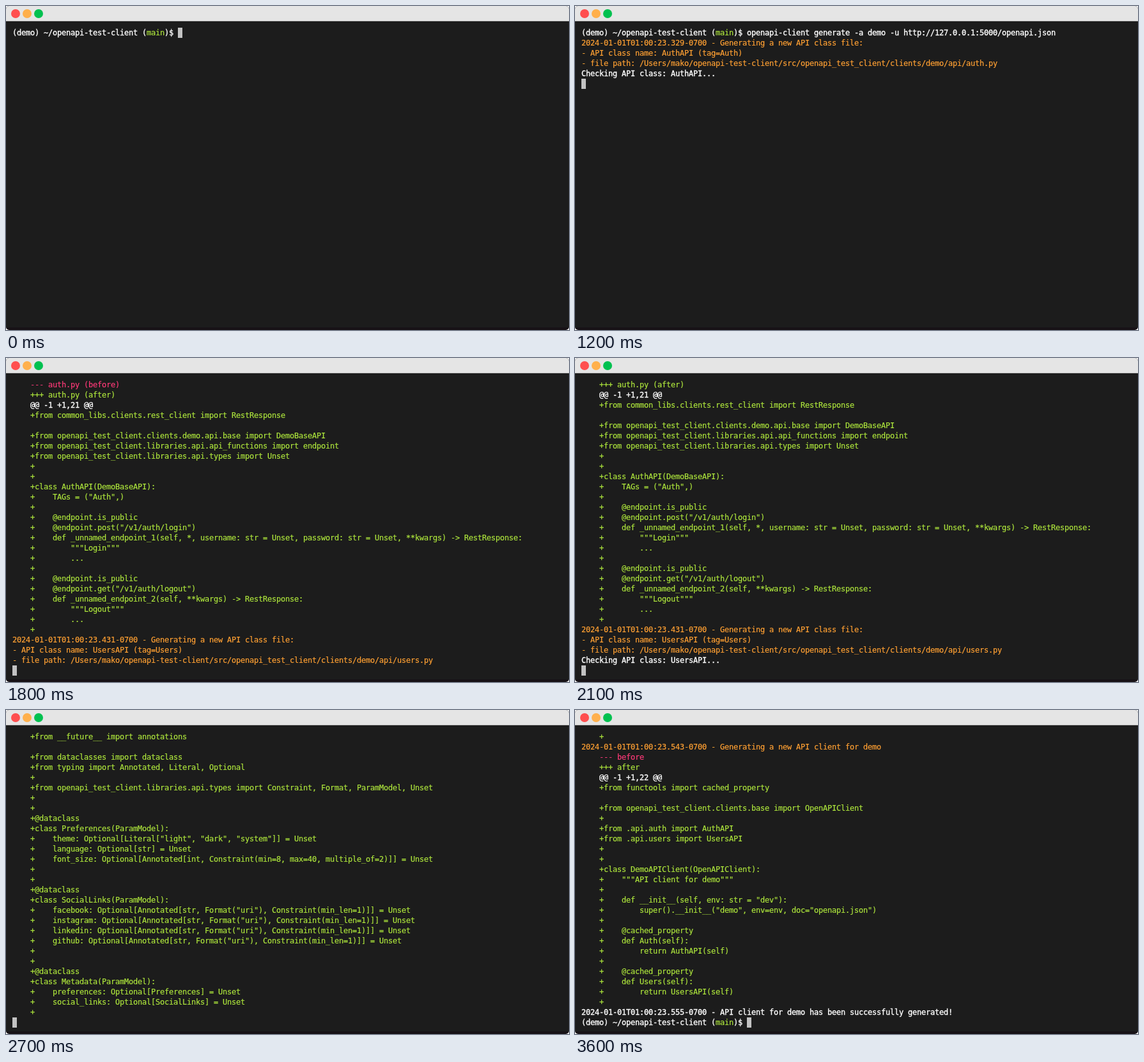
Recreate the animation shown at these times as an HTML page. Size 881 by 508 pixels, loop 4.5 s.

```html
<!DOCTYPE html>
<html lang="en">
<head>
<meta charset="utf-8">
<title>API client generator</title>
<style>
  html, body { margin: 0; width: 881px; height: 508px; overflow: hidden; background: #fff; }
  #win { position: absolute; inset: 0; overflow: hidden; border-radius: 5px; background: #171216; }
  #bar { position: absolute; left: 0; top: 0; width: 100%; height: 23px; background: #e5e5e5; border-bottom: 1px solid #bdbdbd; }
  #bar i { position: absolute; top: 5px; width: 14px; height: 14px; border-radius: 50%; }
  #body { position: absolute; left: 0; top: 24px; width: 100%; height: 480px; background: #1c1c1c; }
  #term {
    position: absolute; left: 10px; top: 34px; margin: 0; color: #fff;
    font: 12px/16px "DejaVu Sans Mono", monospace;
    -webkit-text-stroke: 0.2px currentColor;
  }
  #term div { height: 16px; white-space: pre; }
  #cursor { position: absolute; width: 7px; height: 16px; background: #c2c2c2; }
  .white { color: #fff; -webkit-text-stroke-width: 0.35px; }
  .green { color: #ade53c; }
  .orange { color: #ffa033; }
  .red { color: #fc3a78; }
</style>
</head>
<body>
<div id="win">
  <div id="body"></div>
  <div id="bar">
    <i style="left:8px;background:#ff4f4f"></i>
    <i style="left:26px;background:#ffb04c"></i>
    <i style="left:44px;background:#00c150"></i>
  </div>
  <div id="term"></div>
  <div id="cursor"></div>
</div>
<script>
const COLS = 123, ROWS = 29, CELL = 7, LINE = 16, STEP = 300, LOOP = 4500;
const PROMPT = '(demo) ~/openapi-test-client (main)$ ';
const term = document.getElementById('term');
const cursor = document.getElementById('cursor');

const stamp = ms => `2024-01-01T01:00:23.${ms}-0700 - `;
const announce = (ms, tag) => `${stamp(ms)}Generating a new API class file:
- API class name: ${tag}API (tag=${tag})
- file path: /Users/mako/openapi-test-client/src/openapi_test_client/clients/demo/api/${tag.toLowerCase()}.py
`;
const checking = tag => `Checking API class: ${tag}API...\n`;
const diff = text => text.trim().split('\n').map(s => '    ' + s + '\n').join('');

const authDiff = diff(`
--- auth.py (before)
+++ auth.py (after)
@@ -1 +1,21 @@
+from common_libs.clients.rest_client import RestResponse

+from openapi_test_client.clients.demo.api.base import DemoBaseAPI
+from openapi_test_client.libraries.api.api_functions import endpoint
+from openapi_test_client.libraries.api.types import Unset
+
+
+class AuthAPI(DemoBaseAPI):
+    TAGs = ("Auth",)
+
+    @endpoint.is_public
+    @endpoint.post("/v1/auth/login")
+    def _unnamed_endpoint_1(self, *, username: str = Unset, password: str = Unset, **kwargs) -> RestResponse:
+        """Login"""
+        ...
+
+    @endpoint.is_public
+    @endpoint.get("/v1/auth/logout")
+    def _unnamed_endpoint_2(self, **kwargs) -> RestResponse:
+        """Logout"""
+        ...
+
`);

const usersDiff = diff(`
+    def _unnamed_endpoint_2(
+        self,
+        *,
+        id: Optional[int] = Unset,
+        email: Optional[Annotated[str, Format("email")]] = Unset,
+        role: Optional[Literal["admin", "viewer", "support"]] = Unset,
+        **kwargs,
+    ) -> RestResponse:
+        """Get users"""
+        ...
+
+    @endpoint.get("/v1/users/{user_id}")
+    def _unnamed_endpoint_3(self, user_id: int, /, **kwargs) -> RestResponse:
+        """Get user"""
+        ...
+
+    @endpoint.delete("/v1/users/{user_id}")
+    def _unnamed_endpoint_4(self, user_id: int, /, **kwargs) -> RestResponse:
+        """Delete user"""
+        ...
+
+    @endpoint.content_type("multipart/form-data")
+    @endpoint.post("/v1/users/images")
+    def _unnamed_endpoint_5(self, *, file: File = Unset, description: Optional[str] = Unset, **kwargs) -> RestResponse:
+        """Upload user image"""
+        ...
+
`);

const link = site => `+    ${site}: Optional[Annotated[str, Format("uri"), Constraint(min_len=1)]] = Unset`;
const modelsDiff = diff(`
+from __future__ import annotations

+from dataclasses import dataclass
+from typing import Annotated, Literal, Optional
+
+from openapi_test_client.libraries.api.types import Constraint, Format, ParamModel, Unset
+
+
+@dataclass
+class Preferences(ParamModel):
+    theme: Optional[Literal["light", "dark", "system"]] = Unset
+    language: Optional[str] = Unset
+    font_size: Optional[Annotated[int, Constraint(min=8, max=40, multiple_of=2)]] = Unset
+
+
+@dataclass
+class SocialLinks(ParamModel):
${['facebook', 'instagram', 'linkedin', 'github'].map(link).join('\n')}
+
+
+@dataclass
+class Metadata(ParamModel):
+    preferences: Optional[Preferences] = Unset
+    social_links: Optional[SocialLinks] = Unset
+
`);

const clientDiff = diff(`
--- before
+++ after
@@ -1 +1,22 @@
+from functools import cached_property

+from openapi_test_client.clients.base import OpenAPIClient
+
+from .api.auth import AuthAPI
+from .api.users import UsersAPI
+
+
+class DemoAPIClient(OpenAPIClient):
+    """API client for demo"""
+
+    def __init__(self, env: str = "dev"):
+        super().__init__("demo", env=env, doc="openapi.json")
+
+    @cached_property
+    def Auth(self):
+        return AuthAPI(self)
+
+    @cached_property
+    def Users(self):
+        return UsersAPI(self)
+
`);

// One chunk of terminal output per step
const chunks = [
  PROMPT,
  'openapi-client generate -a demo -u http://127.0.0.1:5000/openapi.json',
  '\n',
  announce(329, 'Auth'),
  checking('Auth'),
  authDiff,
  announce(431, 'Users'),
  checking('Users'),
  usersDiff,
  modelsDiff,
  stamp(543) + 'Generating a new API client for demo\n',
  clientDiff + stamp(555) + 'API client for demo has been successfully generated!\n',
  PROMPT
];

function colour(line) {
  if (/^ +\+/.test(line)) return 'green';
  if (/^ +---/.test(line)) return 'red';
  if (/^- |Generating a new/.test(line)) return 'orange';
  return 'white';
}

function wrap(line) {
  const rows = [], cls = colour(line);
  for (let i = 0; i === 0 || i < line.length; i += COLS) {
    rows.push({ text: line.slice(i, i + COLS), cls });
  }
  return rows;
}

function addSpan(row, text, cls) {
  const span = document.createElement('span');
  span.className = cls;
  span.textContent = text;
  row.append(span);
}

function render(step) {
  const rows = chunks.slice(0, step + 1).join('').split('\n').flatMap(wrap).slice(-ROWS);
  term.replaceChildren(...rows.map(({ text, cls }) => {
    const row = document.createElement('div');
    if (text.startsWith(PROMPT)) {
      const [head, tail] = text.split('main');
      addSpan(row, head, cls);
      addSpan(row, 'main', 'green');
      addSpan(row, tail, cls);
    } else {
      addSpan(row, text, cls);
    }
    return row;
  }));
  cursor.style.left = 10 + CELL * rows[rows.length - 1].text.length + 'px';
  cursor.style.top = 34 + LINE * (rows.length - 1) + 'px';
}

// Fit the font's advance to the terminal grid
function setGrid() {
  const row = document.createElement('div');
  addSpan(row, 'm'.repeat(100), 'white');
  term.replaceChildren(row);
  const advance = row.firstChild.getBoundingClientRect().width / 100;
  term.style.letterSpacing = CELL - advance + 'px';
}

let shown = -1;
const start = performance.now();
function tick() {
  const t = (performance.now() - start) % LOOP;
  const step = Math.min(chunks.length - 1, Math.floor(t / STEP));
  if (step !== shown) render(shown = step);
  requestAnimationFrame(tick);
}
setGrid();
tick();
</script>
</body>
</html>
```
